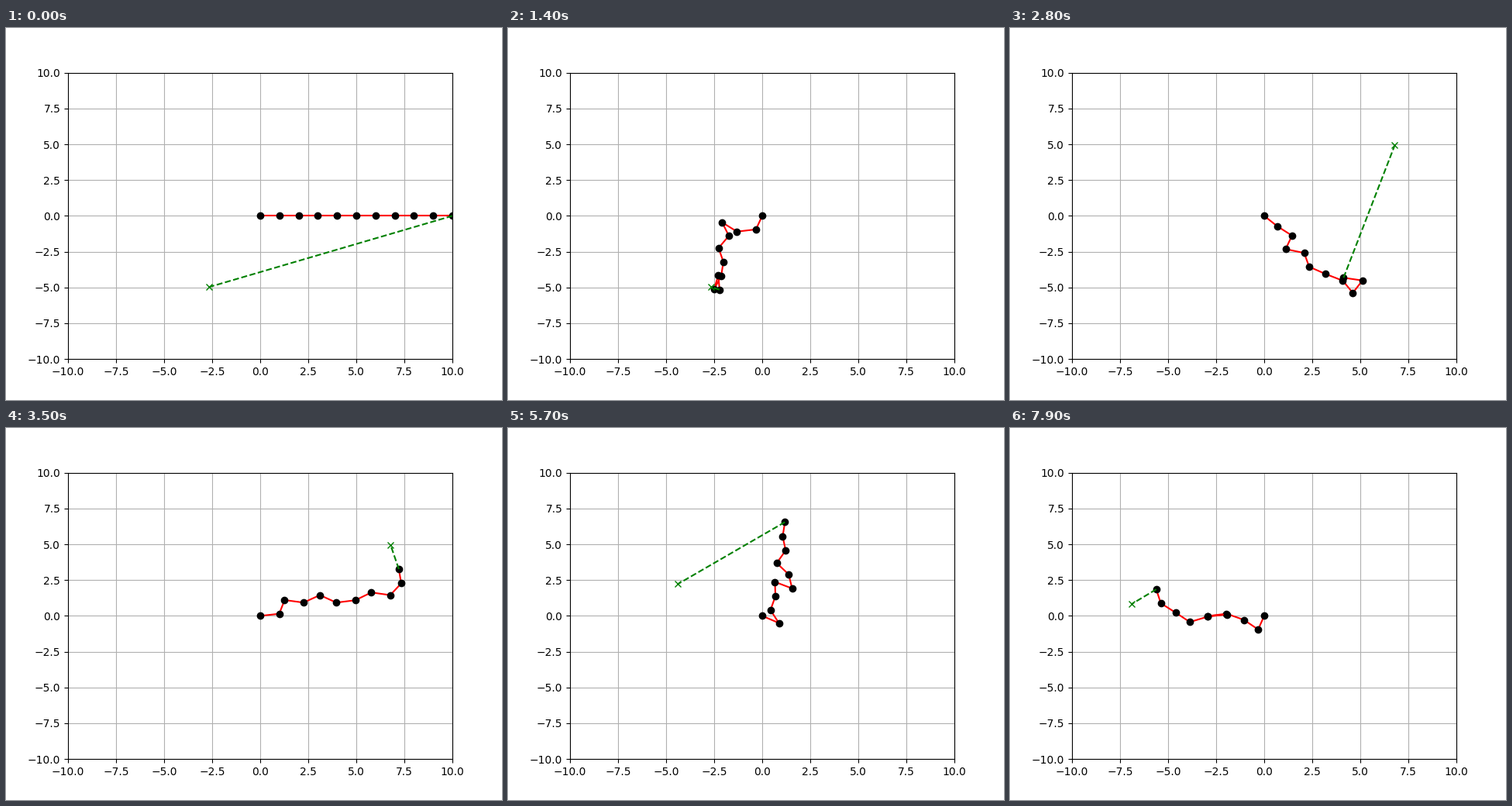
These frames come from a looping animation (640 px wide and 480 px high, 8 s). A matplotlib script:

```python
import numpy as np
import matplotlib.pyplot as plt
from matplotlib.animation import FuncAnimation

REACH = 10
N_LINKS = 10
GAIN = 0.2  # share of the remaining turn covered in each step

# Key poses: goal point, moving frames, direction of each link in degrees
POSES = [
    ((-2.66, -4.97), 23, [-114, -179, 130, -73, -128, -79, -101, -117, 64, -107]),
    ((6.79, 4.92), 27, [23, 104, 16, 44, -20, 20, 49, 2, 54, 78]),
    ((-4.39, 2.22), 22, [-85, 129, 138, 141, -34, 185, 212, 126, 146, 88]),
    ((-6.89, 0.83), 1, [155, 174, 225, 27, 170, 210, 167, 192, 117, 167]),
]


def shortest_turn(target, current):
    return (target - current + 180) % 360 - 180


def arm_points(bends):
    """Positions of the base and all joints for the joint angles in degrees."""
    heading = np.radians(np.cumsum(bends))
    steps = np.column_stack([np.cos(heading), np.sin(heading)])
    return np.vstack([[0, 0], np.cumsum(steps, axis=0)])


def build_timeline():
    """The arm rests while a new goal is set, then every joint eases to it."""
    bends = np.zeros(N_LINKS)
    timeline = []
    for goal, moves, directions in POSES:
        target = np.diff(directions, prepend=0)
        rest = 2 if timeline else 1
        timeline += [(goal, arm_points(bends))] * rest
        for _ in range(moves):
            bends = bends + GAIN * shortest_turn(target, bends)
            timeline.append((goal, arm_points(bends)))
    return timeline


timeline = build_timeline()

fig, ax = plt.subplots(figsize=(6.4, 4.8), dpi=100)
ax.set(xlim=(-REACH, REACH), ylim=(-REACH, REACH))
ax.grid(True)

# Links and joints alternate so that later links cross over earlier joints
links, joints = [], []
for i in range(N_LINKS + 1):
    if i < N_LINKS:
        links += ax.plot([], [], "r-")
    joints += ax.plot([], [], "ko")
goal_mark, = ax.plot([], [], "gx")
goal_line, = ax.plot([], [], "g--")


def update(frame):
    goal, points = timeline[frame]
    for i, link in enumerate(links):
        link.set_data(points[i:i + 2].T)
    for joint, point in zip(joints, points):
        joint.set_data(point[:, None])
    goal_mark.set_data([goal[0]], [goal[1]])
    goal_line.set_data(np.array([points[-1], goal]).T)
    return [*links, *joints, goal_mark, goal_line]


anim = FuncAnimation(fig, update, frames=len(timeline), interval=100,
                     repeat=True, repeat_delay=0)
plt.show()
```
